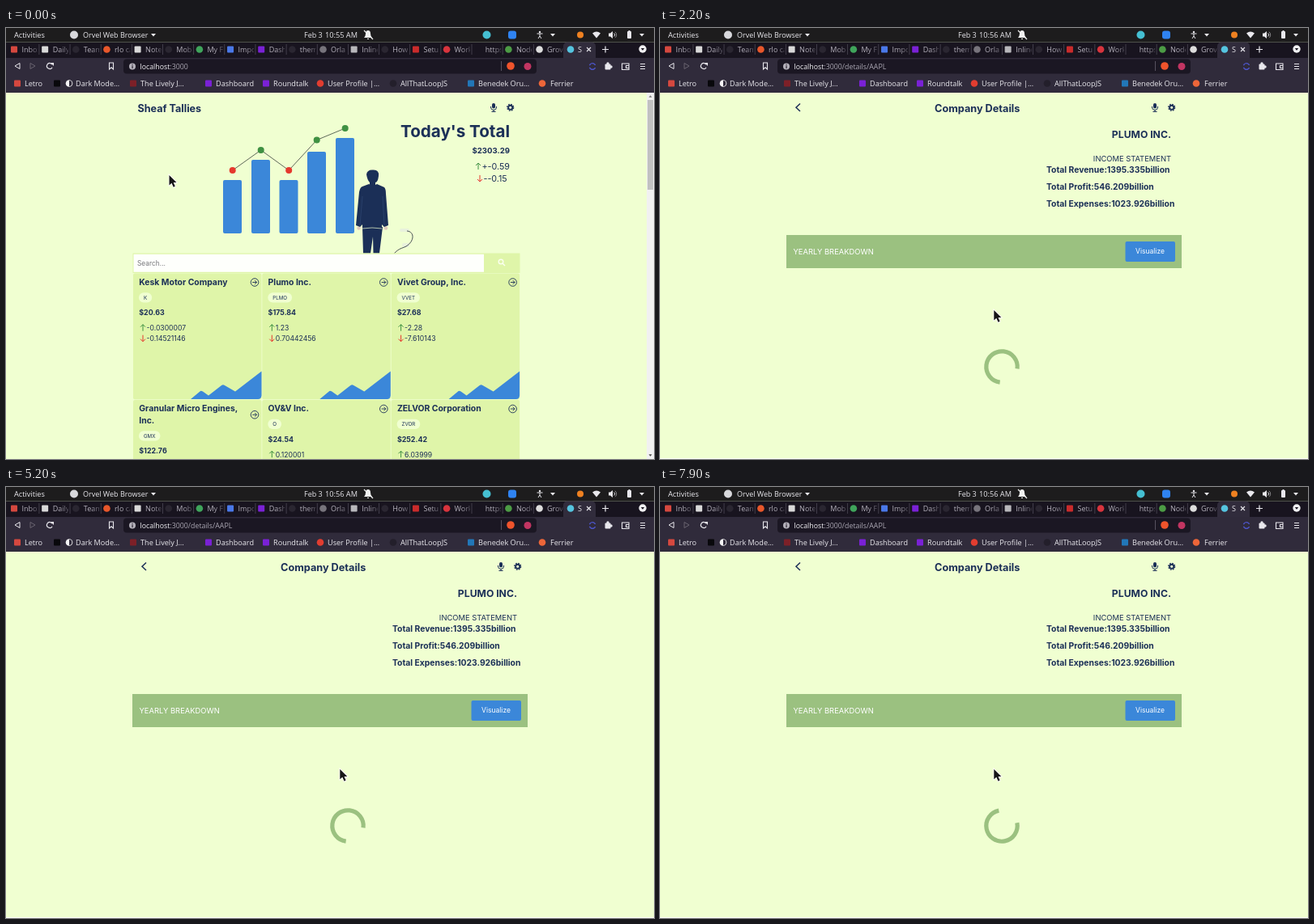
Write an HTML page with a canvas that moves like this. It is 800 px wide and 533 px high and loops after 8000 ms.

```html
<!DOCTYPE html>
<html lang="en">
<head>
<meta charset="utf-8">
<title>Sheaf Tallies</title>
<style>
html, body { margin: 0; width: 100%; height: 100%; overflow: hidden; background: #f0ffd1; }
canvas { display: block; }
</style>
</head>
<body>
<canvas id="stage" width="800" height="533"></canvas>
<script>
const c = document.getElementById('stage').getContext('2d');
const LOOP = 8000;
const UI = '"Open Sans", sans-serif', PAGE = 'Inter, sans-serif';
const NAVY = '#1b2f57', BLUE = '#3b87d9', LIME = '#dff5a9', BG = '#f0ffd1';
const GREEN = '#9bc180', UP = '#3f9142', DOWN = '#e5392d', PALE = '#e9e8ed';

function text(s, x, y, size, color, { weight = 400, align = 'left', font = PAGE } = {}) {
  c.font = `${weight} ${size}px ${font}`;
  c.textAlign = align;
  c.fillStyle = color;
  c.fillText(s, x, y);
}
const ui = (s, x, y, size, color = PALE, weight = 400) => text(s, x, y, size, color, { weight, font: UI });

function box(x, y, w, h, color, r = 0) {
  c.fillStyle = color;
  c.beginPath();
  c.roundRect(x, y, w, h, r);
  c.fill();
}
function dot(x, y, r, color) {
  c.fillStyle = color;
  c.beginPath();
  c.arc(x, y, r, 0, 7);
  c.fill();
}
function ring(x, y, r, color, width = 1, from = 0, to = 7) {
  c.strokeStyle = color;
  c.lineWidth = width;
  c.beginPath();
  c.arc(x, y, r, from, to);
  c.stroke();
}
function line(d, color, width = 1, x = 0, y = 0) {
  c.save();
  c.translate(x, y);
  c.strokeStyle = color;
  c.lineWidth = width;
  c.stroke(new Path2D(d));
  c.restore();
}
function shape(d, color, x = 0, y = 0) {
  c.save();
  c.translate(x, y);
  c.fillStyle = color;
  c.fill(new Path2D(d));
  c.restore();
}
const caret = (x, y) => shape('M-3-1.5H3L0 2Z', PALE, x, y);
// Site marks are plain: 's' square, 'c' circle
function mark(kind, x, y, color) {
  if (kind === 's') box(x - 4, y - 4, 8, 8, color, 1);
  else if (kind === 'c') dot(x, y, 4.3, color);
}

const tabs = [
  ['Inbox', 's', '#d5483f'], ['Daily', 's', '#d9d9d9'], ['Team', 'c', '#2a2631'], ['rlo ca', 'c', '#e8572b'],
  ['Notes', 's', '#d9d9d9'], ['Mobile', 'c', '#2a2631'], ['My Files', 'c', '#3fa45b'], ['Import', 's', '#4a78e8'],
  ['Dashb', 's', '#7a21d6'], ['them', 'c', '#2a2631'], ['Orla', 'c', '#77747c'], ['Inline', 's', '#b8b7bb'],
  ['How', 'c', '#2a2631'], ['Setup', 's', '#c92b2b'], ['Work', 'c', '#d8343d'], ['https', '', ''],
  ['Node', 'c', '#4c9b45'], ['Grove', 'c', '#dddddd']
];
const bookmarks = [
  ['Letro', 14, 23, 's', '#d5483f'], ['', 63, 0, 's', '#08080b'], ['Dark Mode…', 78, 86, 'c', '#f4f4f4'],
  ['The Lively J…', 157, 166, 's', '#7d2028'], ['Dashboard', 250, 259, 's', '#7a21d6'],
  ['Roundtalk', 321, 330, 's', '#7a21d6'], ['User Profile |…', 388, 397, 'c', '#e23d30'],
  ['AllThatLoopJS', 478, 487, 'c', '#231f2b'], ['Benedek Oru…', 574, 583, 's', '#2277b8'],
  ['Ferrier', 662, 672, 'c', '#ed6639']
];
const stocks = [
  [['Kesk Motor Company'], 'K', '$20.63', '-0.0300007', '-0.14521146'],
  [['Plumo Inc.'], 'PLMO', '$175.84', '1.23', '0.70442456'],
  [['Vivet Group, Inc.'], 'VVET', '$27.68', '-2.28', '-7.610143'],
  [['Granular Micro Engines,', 'Inc.'], 'GMX', '$122.76', '', ''],
  [['OV&V Inc.'], 'O', '$24.54', '0.120001', ''],
  [['ZELVOR Corporation'], 'ZVOR', '$252.42', '6.03999', '']
];
const bars = [[268, 188, 176, DOWN], [303, 163, 151, UP], [337.5, 188, 176, DOWN], [372, 153, 138.5, UP], [407, 136, 124, UP]];

function systemBar(t) {
  box(0, 0, 800, 17.5, '#1d1c1d');
  ui('Activities', 10, 11.5, 9.2);
  dot(84, 8.5, 5, '#d8d8dc');
  ui('Orvel Web Browser', 95, 11.5, 9);
  caret(182, 8.5);
  ui('Feb 3', 368, 11.5, 9);
  ui(t < 900 ? '10:55 AM' : '10:56 AM', 394, 11.5, 9.2);
  shape('M-5 4Q-3 2-3-1Q-3-5 0-5Q3-5 3-1Q3 2 5 4ZM-1 5H1V6H-1Z', '#f1f1f1', 447, 8);
  line('M-5-5L6 6', '#f1f1f1', 1.2, 447, 8);
  dot(593.5, 8.5, 5, '#45bfd2');
  box(620, 3.5, 10, 10, '#2f83f2', 3);
  dot(659, 5, 1.2, PALE);
  line('M-3.5-1H3.5M0-1V2L-2 5M0 2L2 5', PALE, 1, 659, 8);
  caret(675, 8.5);
  dot(709, 8.5, 4, '#ef8121');
  shape('M0 4L-5-2Q0-6 5-2Z', PALE, 729, 8.5);
  shape('M-5-2H-3L0-4.5V4.5L-3 2H-5Z', PALE, 749, 8.5);
  ring(749, 8.5, 2.5, PALE, 1, -0.9, 0.9);
  ring(749, 8.5, 4.7, '#8b8a8d', 1, -0.9, 0.9);
  box(767, 4, 5, 9, PALE, 1);
  box(768.5, 3, 2, 2, PALE);
  caret(785, 8.5);
}

function tabStrip() {
  box(0, 17.5, 800, 20, '#18141f');
  tabs.forEach(([label, kind, color], i) => {
    const x = 10 + i * 38.15;
    mark(kind, x, 26.5, color);
    c.save();
    c.beginPath();
    c.rect(x, 18, 29, 19);
    c.clip();
    const fade = c.createLinearGradient(x + 18, 0, x + 29, 0);
    fade.addColorStop(0, '#b5b1bc');
    fade.addColorStop(1, '#4d4955');
    ui(label, x + 9.5, 29.5, 9, fade);
    c.restore();
    if (i < 17) box(x + 30.5, 20, 0.8, 13, '#4d4856');
  });
  box(688, 17.5, 40, 20, '#312c3c', [5, 5, 0, 0]);
  dot(697, 26.5, 4.3, '#55c4df');
  ui('S', 706, 29.5, 9);
  line('M-2.5-2.5L2.5 2.5M2.5-2.5L-2.5 2.5', PALE, 1.1, 719.5, 26.5);
  line('M-4 0H4M0-4V4', PALE, 1.2, 740, 26.5);
  dot(786, 26, 4.7, '#f0f0f2');
  shape('M-2.2-1H2.2L0 1.8Z', '#18141f', 786, 26);
}

function toolbar(t) {
  box(0, 37, 800, 43, '#302b3b');
  line('M3-3.5V3.5L-3 0Z', PALE, 1, 14, 47);
  line('M-3-3.5V3.5L3 0Z', '#68636f', 1, 33, 47);
  ring(54, 47, 3.5, PALE, 1.2, 0.5, 5.7);
  shape('M1-4H5V0Z', PALE, 54, 47);
  line('M-2.5-4H2.5V4L0 1.8L-2.5 4Z', PALE, 1.1, 130, 47);
  box(145, 38.5, 510, 18, '#1b1723', 4);
  dot(156, 47.5, 4, '#b4b1ba');
  box(155.5, 46.5, 1.1, 3.5, '#1b1723');
  box(155.5, 44.8, 1.1, 1, '#1b1723');
  ui('localhost', 165.5, 50.5, 8.8, '#f1f0f4');
  const hostEnd = 165.5 + c.measureText('localhost').width;
  ui(t < 2000 ? ':3000' : ':3000/details/AAPL', hostEnd, 50.5, 8.8, '#aaa6b2');
  box(611, 41, 1, 12, '#57525f');
  dot(623, 47, 4.8, '#f0542c');
  dot(644, 47.5, 4.5, '#c23562');
  ring(724, 47.5, 3.8, '#4d55c8', 1.4, 0.4, 2.8);
  ring(724, 47.5, 3.8, '#4d55c8', 1.4, 3.5, 5.9);
  box(739.5, 44.5, 7, 7, PALE, 1);
  dot(743, 44, 1.7, PALE);
  dot(747, 48, 1.7, PALE);
  line('M-4.5-3.5H4V4H-4.5ZM4-1H.5V2H4', PALE, 1.1, 765, 47.5);
  line('M-3-3H3M-3 0H3M-3 3H3', PALE, 1.2, 786, 47.5);
  for (const [label, x, textX, kind, color] of bookmarks) {
    mark(kind, x, 68.5, color);
    ui(label, textX, 71.7, 9.15);
  }
  shape('M0-3.4A3.4 3.4 0 0 1 0 3.4Z', '#302b3b', 78, 68.5);
}

function pageIcons(x) {
  box(x - 2, 93, 4, 6.5, NAVY, 2);
  line('M-3.5-1V0Q-3.5 3.5 0 3.5Q3.5 3.5 3.5 0V-1M0 3.5V6M-2.5 5.5H2.5', NAVY, 1, x, 98);
  c.setLineDash([1.7, 1.44]);
  ring(x + 20.7, 98.3, 4, NAVY, 1.2);
  c.setLineDash([]);
  ring(x + 20.7, 98.3, 2.6, NAVY, 1.9);
}

function trend(x, y, up, label, size) {
  line(up ? 'M0 4V-4M-3-1L0-4L3-1' : 'M0-4V4M-3 1L0 4L3 1', up ? UP : DOWN, 1, x, y);
  text(label, x + 4.5, y + size * 0.4, size, NAVY);
}

function hero(t) {
  text('Sheaf Tallies', 162.5, 103.5, 12.6, NAVY, { weight: 700 });
  pageIcons(602);
  const right = { weight: 700, align: 'right' };
  text("Today's Total", 622, 135, 20.6, NAVY, right);
  text('$2303.29', 622, 155, 9.6, NAVY, right);
  trend(583, 171, true, '+-0.59', 10.7);
  trend(585, 186, false, '--0.15', 10.7);

  for (const [x, top] of bars) box(x, top, 23, 254 - top, BLUE, 2);
  line('M' + bars.map(([x, , y]) => `${x + 11.7} ${y}`).join('L'), '#38433a', 0.8);
  const glow = 0.5 + 0.5 * Math.cos(t * Math.PI / 2000);
  for (const [x, , y, color] of bars) {
    ring(x + 11.7, y, 2.4, '#b9dda0', 0.8);
    c.globalAlpha = glow;
    dot(x + 11.7, y, 4, color);
    c.globalAlpha = 1;
  }

  shape('M445 181Q446 175 453 175.5Q461 175 460 183Q459 191 456 191V195H449V191Q446 188 445 181Z', NAVY);
  dot(435.5, 247.5, 2.2, '#dfc9bd');
  dot(469, 247.5, 2.2, '#dfc9bd');
  shape('M440 246H465L461 278.5H453.5L453 258L450 278.5H441Z', NAVY);
  shape('M448 193Q453 196 458 193L467 197Q469 199 469 205L472 244L467 246L464 243V248Q452 246 440 248V243L437 246L432 244L436 203Q437 197 440 196Z', NAVY);
  line('M440 208L437 244M465 208L467 244', '#36507c', 0.5);
  line('M440 248Q452 246 464 248', BG, 0.7);
  box(486, 248, 12, 4, '#e8f1dc', 2);
  box(489, 266, 9, 5, '#e8f1dc', 2);
  line('M479.5 278.5C486 272 488 273 494 270C504 264 505 252 495 251', '#333c45', 0.9);
}

function searchRow() {
  box(156.5, 278.5, 478, 24.5, LIME);
  box(157.5, 279.7, 432.5, 22, '#fefffc');
  text('Search...', 162, 294, 8.4, '#77777c');
  ring(611, 289, 2.8, '#fbfff0', 1.4);
  line('M613 291L616 294', '#fbfff0', 1.5);
}

function card([title, ticker, price, up, down], i) {
  const x = 157 + (i % 3) * 159.3, y = 303.5 + (i > 2 ? 156.5 : 0);
  c.save();
  c.translate(x, y);
  box(0, 0, 158.5, 155.7, LIME, 2);
  title.forEach((s, row) => text(s, 7.3, 14.3 + row * 14.5, 10.4, NAVY, { weight: 700 }));
  const wrap = (title.length - 1) * 14.5;
  ring(150, 11 + wrap / 2, 4.8, NAVY, 0.9);
  line('M-2.7 0H2.5M.2-2.3L2.5 0L.2 2.3', NAVY, 0.9, 150, 11 + wrap / 2);
  c.translate(0, wrap);
  c.font = `6.2px ${PAGE}`;
  const chip = c.measureText(ticker).width + 12;
  box(7, 23.7, chip, 12.2, BG, 6);
  text(ticker, 7 + chip / 2, 32.1, 6.2, NAVY, { align: 'center' });
  text(price, 7.3, 51.8, 8.9, NAVY, { weight: 700 });
  if (up) trend(12, 67.2, true, up, 8.6);
  if (down) trend(12, 80.2, false, down, 8.6);
  if (i < 3) shape('M71 155.5L83 145.5Q84 145 86 146L93 151L109 138.5Q111 137 113 138.5L126 146L158.5 121V151Q158 155.5 154 155.5Z', BLUE);
  c.restore();
}

function listPage(t) {
  hero(t);
  searchRow();
  stocks.forEach(card);
  box(791, 80, 9, 453, '#f1f1f1');
  box(792, 89, 7, 111, '#c1c1c1');
  shape('M-2 1.3H2L0-1.3Z', '#777777', 795.5, 84.5);
  shape('M-2-1.3H2L0 1.3Z', '#444444', 795.5, 528.5);
}

function detailPage(t) {
  line('M173 93.5L168 98.2L173 103', NAVY, 1.5);
  text('Company Details', 391.7, 103.7, 12.7, NAVY, { weight: 700, align: 'center' });
  pageIcons(611);
  text('PLUMO INC.', 631, 136.3, 12.2, NAVY, { weight: 700, align: 'right' });
  text('INCOME STATEMENT', 631, 164.5, 9.4, NAVY, { align: 'right' });
  ['Total Revenue:1395.335billion', 'Total Profit:546.209billion', 'Total Expenses:1023.926billion']
    .forEach((s, i) => text(s, 477, 179 + i * 21, 10.35, NAVY, { weight: 700 }));
  box(156, 256, 488, 41, GREEN);
  text('YEARLY BREAKDOWN', 164.5, 280, 9.4, '#ffffff');
  box(574.5, 264, 61.5, 25, BLUE, 2);
  text('Visualize', 605, 279.3, 8.5, '#ffffff', { align: 'center' });
  const gap = (t * 0.36 - 20) * Math.PI / 180;
  ring(422, 419, 19.2, GREEN, 5.2, gap + Math.PI / 4, gap + Math.PI * 7 / 4);
  box(0, 532, 800, 1, '#fdfffa');
}

function pointer(t) {
  const p = Math.min(1, Math.max(0, (t - 800) / 900));
  const ease = p * p * (3 - 2 * p);
  const x = 201.5 + 210.8 * ease, y = 182 + 167 * ease;
  const d = 'M0 0V12.5L3 9.8L5.2 14.8L7.3 13.8L5.2 9H9Z';
  line(d, '#ffffff', 1.6, x, y);
  shape(d, '#161616', x, y);
}

const stalls = [[0, 400], [400, 900], [1800, 2000], [4000, 4200], [5500, 5700], [6400, 6600], [6900, 7100]];
function stepped(ms) {
  const t = Math.floor(ms / 100) * 100;
  const stall = stalls.find(([from, to]) => t >= from && t < to);
  return stall ? stall[0] : t;
}

function draw() {
  const t = stepped(performance.now() % LOOP);
  box(0, 0, 800, 533, BG);
  if (t < 2100) listPage(t);
  else detailPage(t);
  systemBar(t);
  tabStrip();
  toolbar(t);
  pointer(t);
  requestAnimationFrame(draw);
}
draw();
</script>
</body>
</html>
```
